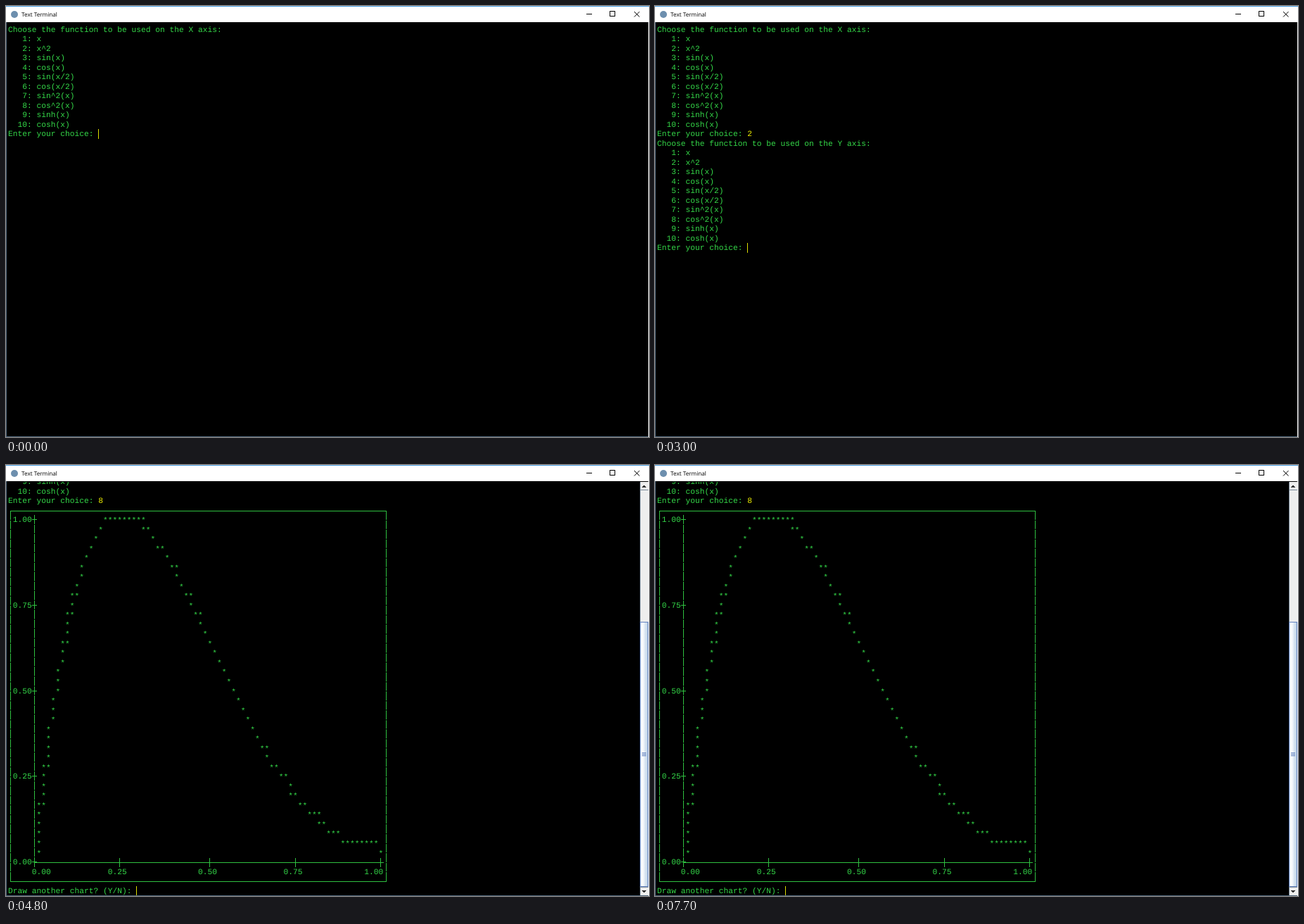
Recreate the animation shown at these times as an HTML page. Size 914 px wide and 613 px high, loop 8000 ms.

```html
<!DOCTYPE html>
<html>
<head>
<meta charset="utf-8">
<style>
  html, body { margin: 0; width: 100%; height: 100%; overflow: hidden; background: #000; }
  svg { display: block; }
  text { font: 11.25px "Liberation Mono", monospace; white-space: pre; text-rendering: geometricPrecision; fill: #34d848; }
  .input { fill: #ee0; }
  .title { font: 8.2px "Open Sans", sans-serif; fill: #000; }
  .lines { fill: none; stroke: #2fc040; shape-rendering: crispEdges; }
  .dashed { stroke-dasharray: 12.5 1.03; }
  .crisp { shape-rendering: crispEdges; }
</style>
</head>
<body>
<svg width="914" height="613" viewBox="0 0 914 613">
  <defs>
    <linearGradient id="thumb">
      <stop offset="0" stop-color="#dde8f3"/>
      <stop offset=".3" stop-color="#fff"/>
      <stop offset=".6" stop-color="#dde8f3"/>
      <stop offset="1" stop-color="#b8cfe5"/>
    </linearGradient>
  </defs>
  <rect width="914" height="613"/>
  <g id="menus"></g>
  <g id="chart"></g>
  <rect id="caret" class="crisp" width="1"/>

  <g id="scrollbar" class="crisp">
    <rect x="901" y="24" width="12" height="588" fill="#eee"/>
    <path d="M901.5 24v588M901 35.5h12M901 600.5h12" stroke="#7a8a99"/>
    <rect x="901.5" y="223.5" width="11" height="376" fill="url(#thumb)" stroke="#6382bf"/>
    <path d="M904 409.5h6M904 411.5h6M904 413.5h6" stroke="#6382bf"/>
    <path d="M904 31.500h6l-3-3.500zM904 605h6l-3 3.500z" fill="#333"/>
  </g>

  <rect y="23" width="914" height="1"/>
  <rect width="914" height="23" fill="#fff"/>
  <circle cx="12" cy="12" r="5" fill="#6d8fae"/>
  <text class="title" x="22" y="15">Text Terminal</text>
  <g fill="none" stroke="#000">
    <path class="crisp" d="M825 11.500h8M858.500 7.500h7v7h-7z"/>
    <path d="M893 8l7.500 7.500M900.500 8l-7.500 7.500"/>
  </g>
  <g class="crisp" fill="none">
    <path d="M.5 23V612.500H913" stroke="#4c6378"/>
    <path d="M913.500 0V613" stroke="#fff"/>
    <path d="M0 .5H914" stroke="#4a9fe3"/>
  </g>
</svg>
<script>
const CELL = 6.75, LINE = 13.5, CHART_LINE = 13.53, LEFT = 3;
const $ = id => document.getElementById(id);
const colX = col => LEFT + CELL * col;
const colMid = col => Math.floor(colX(col + 0.5)) + 0.5;
const rowY = row => Math.round(36.5 + LINE * row);
const text = (col, y, str, attrs = '') => `<text x="${colX(col)}" y="${y}" ${attrs}>${str}</text>`;

const functions = ['x', 'x^2', 'sin(x)', 'cos(x)', 'sin(x/2)', 'cos(x/2)',
  'sin^2(x)', 'cos^2(x)', 'sinh(x)', 'cosh(x)'];

function menu(axis, id, firstRow, answer) {
  const lines = [
    `Choose the function to be used on the ${axis} axis:`,
    ...functions.map((name, i) => `${String(i + 1).padStart(4)}: ${name}`),
    'Enter your choice: '
  ];
  return `<g id="menu${id}">` +
    lines.map((line, i) => text(0, rowY(firstRow + i), line)).join('') +
    text(19, rowY(firstRow + 11), answer, `id="answer${id}" class="input"`) + '</g>';
}

function chart() {
  const quarters = [0, 0.25, 0.5, 0.75, 1];
  const axisY = 565.5;
  let labels = '', ticks = '', stars = '';

  for (const q of quarters) {
    const col = 5 + Math.round(73 * q);
    const y = 81 + CHART_LINE * 36 * (1 - q);
    const labelCol = q === 0 ? 5 : q === 1 ? 75 : col - 2;
    labels += text(1, Math.round(y), q.toFixed(2)) + text(labelCol, 582, q.toFixed(2));
    ticks += `M37 ${Math.round(y - 4) + 0.5}h7M${colMid(col)} 559v13`;
  }

  // x = t^2 against y = sin^2(pi t), snapped to character cells
  const cells = new Set();
  const steps = 148;
  for (let k = 0; k <= steps; k++) {
    const t = k / steps;
    const col = 6 + Math.floor(72 * t * t);
    const row = Math.floor(35 * (1 - Math.sin(Math.PI * t) ** 2));
    cells.add(`${col},${row}`);
  }
  for (const cell of cells) {
    const [col, row] = cell.split(',').map(Number);
    stars += text(col, Math.round(82 + CHART_LINE * row), '*');
  }

  return labels + stars + text(0, 609, 'Draw another chart? (Y/N): ') +
    `<g class="lines">
      <path d="M6 65.500H541M6 592.500H541M40 ${axisY}H537${ticks}"/>
      <path class="dashed" d="M6.500 65V592M540.500 65V592M40.500 71V571"/>
    </g>`;
}

$('menus').innerHTML = menu('X', 1, 0, '2') + menu('Y', 2, 12, '8');
$('chart').innerHTML = chart();

const DURATION = 8000;
const blinks = [500, 1000, 1500, 2000, 2600, 3000, 3500, 3900, 5300, 5800, 6300, 6800, 7300, 7700];
const caretStops = [
  { at: 0, x: 131, y: 175 },
  { at: 2100, x: 138, y: 175 },
  { at: 3000, x: 131, y: 337 },
  { at: 4300, x: 138, y: 337 },
  { at: 4700, x: 3, y: 350, color: '#ddd' },
  { at: 4800, x: 185, y: 599, height: 13 }
];

const show = (id, visible) => $(id).setAttribute('visibility', visible ? 'visible' : 'hidden');

function render(time) {
  const charted = time >= 4800;
  show('answer1', time >= 2100);
  show('menu2', time >= 3000);
  show('answer2', time >= 4300);
  show('chart', charted);
  show('scrollbar', charted);
  $('menus').setAttribute('transform', `translate(0 ${charted ? -293 : 0})`);

  const { x, y, height = 14, color = '#dd0' } = caretStops.findLast(stop => time >= stop.at);
  const caret = $('caret');
  caret.setAttribute('x', x);
  caret.setAttribute('y', y);
  caret.setAttribute('height', height);
  caret.setAttribute('fill', color);
  show('caret', blinks.filter(at => time >= at).length % 2 === 0);
}

const start = performance.now();
function tick() {
  render((performance.now() - start) % DURATION);
  requestAnimationFrame(tick);
}
tick();
</script>
</body>
</html>
```
